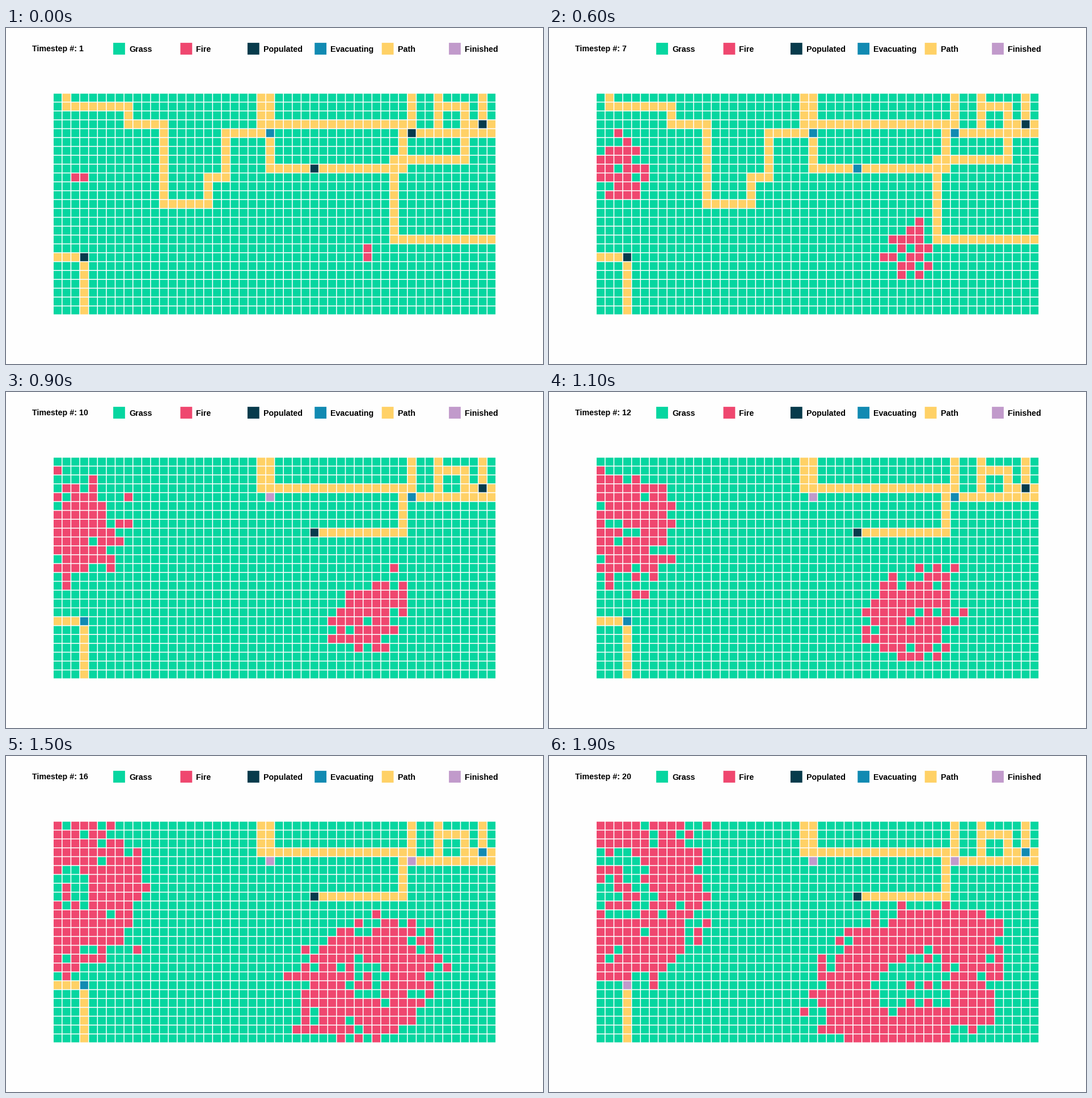
Recreate the animation shown at these times as a matplotlib script. Size 947 by 592 pixels, loop 2 s.

```python
import matplotlib.pyplot as plt
import numpy as np
from matplotlib.animation import FuncAnimation
from matplotlib.collections import PolyCollection
from matplotlib.colors import to_rgba_array
from matplotlib.patches import Rectangle

W, H, DPI = 947, 592, 100
COLS, ROWS, STEPS = 50, 25, 20
X0, Y0, PITCH = 84, 115.7, 15.615
CELL = .9 * PITCH

NAMES = ["Grass", "Fire", "Populated", "Evacuating", "Path", "Finished"]
COLORS = ["#06d6a0", "#ef476f", "#073b4c", "#118ab2", "#ffd166", "#c19acb"]
GRASS, FIRE, POPULATED, EVACUATING, PATH, FINISHED = range(6)
RGBA = to_rgba_array(COLORS)

# Roads as corner points (col, row), with the step at which they vanish.
ROADS = [
    (8, [(1, 0), (1, 1), (8, 1), (8, 3), (12, 3), (12, 12), (17, 12),
         (17, 9), (19, 9), (19, 4), (23, 4)]),
    (8, [(24, 5), (24, 8), (28, 8)]),
    (8, [(46, 5), (46, 7), (38, 7), (38, 16), (49, 16)]),
    (17, [(0, 18), (2, 18)]),
    (STEPS, [(3, 19), (3, 24)]),
    (STEPS, [(23, 0), (23, 3), (40, 3), (40, 0)]),
    (STEPS, [(24, 0), (24, 3)]),
    (STEPS, [(30, 8), (39, 8), (39, 4)]),
    (STEPS, [(41, 4), (49, 4)]),
    (STEPS, [(43, 0), (43, 3)]),
    (STEPS, [(43, 1), (46, 1), (46, 3), (49, 3)]),
    (STEPS, [(48, 0), (48, 2)]),
]

# Towns: (col, row) and the steps at which their state changes.
TOWNS = {
    (24, 4): [(0, EVACUATING), (8, FINISHED)],
    (40, 4): [(0, POPULATED), (3, EVACUATING), (12, FINISHED)],
    (29, 8): [(0, POPULATED), (4, EVACUATING), (8, POPULATED)],
    (48, 3): [(0, POPULATED), (14, EVACUATING)],
    (3, 18): [(0, POPULATED), (8, EVACUATING), (17, FINISHED)],
}

noise = np.random.default_rng(4).random((ROWS, COLS))
row, col = np.mgrid[:ROWS, :COLS]


def burn_chance(t, cx, cy, rx, ry, slant=0):
    """Burning is likely inside a growing ellipse, rare in its spent core."""
    dy = row - cy
    d = np.hypot((col - cx + slant * dy) / rx, dy / ry)
    depth = (1 - d) * (rx + ry) / 2
    chance = .93 / (1 + np.exp(-2 * depth))
    return np.where(d < .02 * t, .22, chance)


def burning(t):
    if t == 0:
        west = (row == 9) & ((col == 2) | (col == 3))
        east = (col == 35) & ((row == 17) | (row == 18))
        return west | east
    west = burn_chance(t, 2, 9 - .11 * t, .5 * t, .56 * t)
    grown = t / (STEPS - 1)
    east = burn_chance(t, 35, 17.5, 10.5 * grown ** 1.3, 8.5 * grown, .3)
    return (noise + .03 * t) % 1 < np.maximum(west, east)


def grid_at(t):
    grid = np.where(burning(t), FIRE, GRASS)
    for end, pts in ROADS:
        if t < end:
            for (c0, r0), (c1, r1) in zip(pts, pts[1:]):
                grid[min(r0, r1):max(r0, r1) + 1,
                     min(c0, c1):max(c0, c1) + 1] = PATH
    for (c, r), states in TOWNS.items():
        grid[r, c] = [s for start, s in states if start <= t][-1]
    return grid


fig = plt.figure(figsize=(W / DPI, H / DPI), dpi=DPI, facecolor="#fefefe")
ax = fig.add_axes([0, 0, 1, 1])
ax.set(xlim=(0, W), ylim=(H, 0))
ax.axis("off")


def label(x, y, text):
    return ax.text(x, y, text, family="Liberation Sans", weight="bold",
                   size=14.2 * 72 / DPI, color="black", va="baseline")


for i, (name, color) in enumerate(zip(NAMES, COLORS)):
    x = 189.1 + 118.4 * i
    ax.add_patch(Rectangle((x, 26.1), 20.8, 20.8, fc=color, lw=0, snap=False))
    label(x + 28, 42, name)
counter = label(46.5, 41.5, "")

corners = CELL * np.array([(0, 0), (1, 0), (1, 1), (0, 1)])
origins = np.column_stack([X0 + PITCH * col.ravel(), Y0 + PITCH * row.ravel()])
cells = PolyCollection(origins[:, None] + corners, linewidths=0, snap=False)
ax.add_collection(cells, autolim=False)


def update(t):
    cells.set_facecolor(RGBA[grid_at(t).ravel()])
    counter.set_text(f"Timestep #: {t + 1}")
    return cells, counter


anim = FuncAnimation(fig, update, frames=STEPS, interval=100, repeat=True,
                     init_func=lambda: update(0))
plt.show()
```
